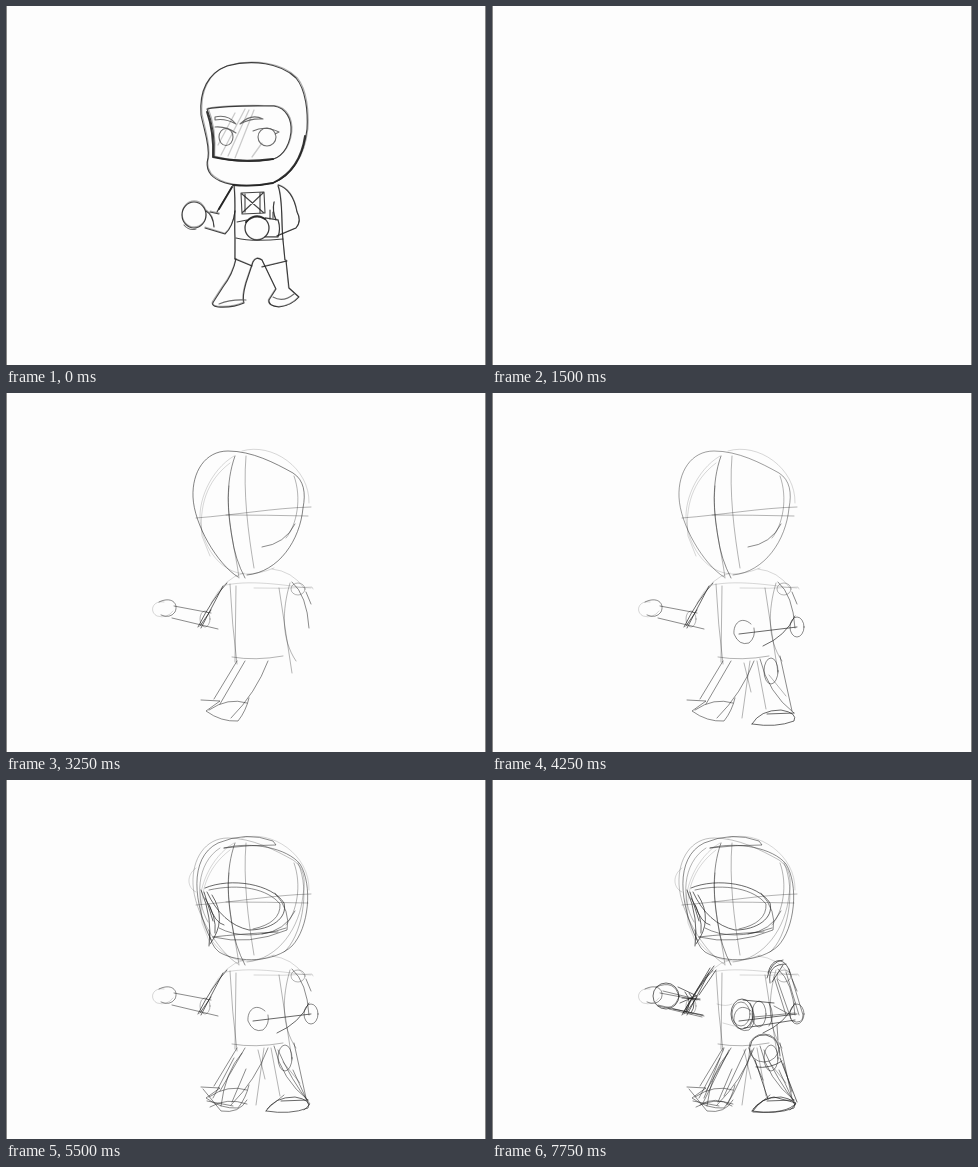
Animation, 480 px wide and 359 px high, one loop 8000 ms. Source, as an HTML page without scripts:

```html
<!DOCTYPE html>
<html lang="en">
<head>
<meta charset="utf-8">
<title>Pencil sketch</title>
<style>
  @property --t { syntax: "<number>"; inherits: true; initial-value: 0; }
  html, body { margin: 0; width: 100%; height: 100%; overflow: hidden; background: #fdfdfd; }
  /* --t counts quarter seconds */
  svg { display: block; width: 100%; height: 100%; animation: clock 8s steps(32) infinite; }
  @keyframes clock { from { --t: 0; } to { --t: 32; } }
  path, ellipse { fill: none; stroke: #222; stroke-width: .8; stroke-linecap: round; stroke-linejoin: round; }
  .step { --off: 99; opacity: min(var(--t) - var(--at) + 1, var(--off) - var(--t)); }
  .inked { opacity: calc((6 - var(--t)) * .55); }
  .skull { opacity: min(var(--t) - 7, max(.42, 1 - (var(--t) - 9) * .045)); }
  .faint { stroke-opacity: .22; }
  .soft { stroke-opacity: .42; }
  .mid { stroke-opacity: .65; }
  .dark { stroke-opacity: .85; }
  .ink path, .ink ellipse { stroke-width: 1.1; stroke-opacity: .85; }
  .ink .heavy { stroke-width: 1.9; stroke-opacity: .9; }
  .ink .face { stroke: #555; }
  .ink .glare { stroke: #aaa; stroke-width: 1.3; stroke-opacity: .6; }
</style>
</head>
<body>
<svg viewBox="0 0 480 359" preserveAspectRatio="none">
  <rect width="480" height="359" fill="#fdfdfd"/>

  <!-- finished figure -->
  <g class="inked ink">
    <g id="outline">
      <path d="M195 109C193 85 202 67 221 60C246 53 275 57 290 72C300 84 302 106 301 123C298 150 286 170 267 177C250 181 228 181 214 175C203 170 199 163 202 152C204 139 198 124 195 109"/>
      <path d="M201 103C224 99 248 100 268 100C280 102 286 113 285 126C283 143 274 153 263 154C244 157 224 155 208 151C209 134 207 117 201 103"/>
      <path d="M228 180C230 198 228 213 229 232V253M272 180C277 193 275 215 277 234L279 254"/>
      <path d="M226 181L211 206M229 205Q227 221 219 228L199 222M200 205Q207 209 208 221M204 206L213 208"/>
      <path d="M272 179C282 182 288 190 291 206Q296 215 290 222L271 230M268 196Q266 205 270 214"/>
      <ellipse cx="188" cy="209" rx="12" ry="13"/>
      <ellipse cx="251" cy="222" rx="12" ry="12"/>
      <path d="M259 212L272 214Q275 223 272 231L259 231"/>
      <path d="M230 253Q227 268 217 281L208 295Q204 300 212 301Q227 302 238 297Q236 291 240 277L247 256Q250 250 256 254L270 283L263 294Q262 300 273 301Q285 300 293 291L283 282L280 254"/>
      <path d="M229 253L246 260M256 261L281 255"/>
    </g>
    <use href="#outline" transform="rotate(.5 245 180) translate(.4 -.6)" opacity=".42"/>
    <path class="heavy" d="M201 106Q208 126 207 151Q233 157 267 153M299 130C296 151 286 168 267 177Q247 181 227 179"/>
    <path class="heavy" d="M226 181L213 203M240 216Q249 207 259 213"/>
    <g id="chest">
      <path d="M235 187L258 186L259 207L236 208ZM236 188L258 207M257 187L236 207"/>
      <path d="M239 188V206M254 187V207M264 204V213M267 206V212M231 216L241 214M230 232Q246 236 277 233"/>
    </g>
    <path class="glare" d="M243 104L222 150M248 104L229 152M239 103L215 149M256 137L246 151M229 107L212 139"/>
    <path class="face" d="M209 111Q222 108 230 118Q219 112 209 114ZM234 118Q245 107 257 113Q245 112 234 118Z"/>
    <path class="face" d="M209 121Q220 120 230 127M247 125Q259 119 273 126L269 128"/>
    <ellipse class="face" cx="220" cy="131" rx="7" ry="8.5"/>
    <ellipse class="face" cx="261" cy="131" rx="9" ry="9"/>
    <path class="face" d="M178 219Q183 225 190 223M213 298Q225 293 240 294M267 291Q277 297 288 288"/>
  </g>

  <!-- head -->
  <g class="skull">
    <path class="dark" d="M232 184C211 171 188 131 187 104C186 79 199 58 222 58C246 58 269 70 287 80C298 87 300 100 297 115C294 147 273 179 241 182"/>
  </g>
  <g class="step" style="--at:8">
    <path class="faint" d="M236 58C266 49 304 75 303 110M228 63C204 77 190 111 195 133C199 156 215 180 240 181Q254 181 268 175M224 70C200 88 193 114 196 143L204 163"/>
    <path class="mid" d="M229 63C219 91 222 119 226 144Q229 166 239 185"/>
    <path class="soft" d="M223 93C219 125 230 158 233 185M240 63C237 99 242 139 248 175"/>
    <path class="soft" d="M190 125C230 122 267 115 305 114M220 122Q260 122 302 123"/>
  </g>
  <g class="step" style="--at:9">
    <path class="soft" d="M288 83C296 105 291 132 280 145"/>
    <path class="mid" d="M289 131Q279 151 256 154"/>
    <path class="faint" d="M248 195Q278 196 306 194L307 196M266 176Q286 178 298 195"/>
  </g>
  <g class="step" style="--at:9;--off:10">
    <path class="soft" d="M298 195C305 209 302 222 298 230"/>
    <path class="dark" d="M300 225Q297 234 290 240"/>
  </g>

  <!-- torso, left arm and left leg -->
  <g class="step" style="--at:10">
    <path class="faint" d="M220 192C249 186 286 194 305 195M238 180Q219 184 205 210"/>
    <path class="soft" d="M224 191Q226 232 231 271M230 193L229 269M273 195L286 280M284 190C276 217 275 246 290 268"/>
    <path class="soft" d="M226 264Q249 268 277 263"/>
  </g>
  <g class="step" style="--at:11">
    <path class="dark" d="M221 190Q206 206 192 234M217 193L195 235M205 217L194 233"/>
    <path class="mid" d="M168 213L205 220M166 225L212 236"/>
    <path class="mid" d="M153 209C165 203 173 210 169 219Q164 226 155 222"/>
    <path class="faint" d="M158 209C146 207 143 219 151 223Q161 226 167 218"/>
    <ellipse class="soft" cx="199" cy="226" rx="5" ry="8"/>
  </g>
  <g class="step" style="--at:12">
    <path class="mid" d="M231 268L208 306M239 268L214 311M262 268Q250 300 225 325"/>
    <path class="mid" d="M195 307L214 308L200 318Q215 329 232 328Q240 318 243 305M203 317Q222 304 241 310"/>
  </g>

  <!-- right arm and right leg -->
  <g class="step" style="--at:13">
    <path class="mid" d="M286 189Q301 202 303 235M300 199L305 211"/>
    <ellipse class="soft" cx="292" cy="196" rx="7" ry="6"/>
  </g>
  <g class="step" style="--at:14">
    <ellipse class="mid" cx="305" cy="234" rx="7" ry="10"/>
    <path class="dark" d="M247 241L305 234M271 253Q294 243 303 223"/>
  </g>
  <g class="step" style="--at:15">
    <path class="mid" d="M259 231C249 222 241 231 242 241Q247 253 257 250Q264 244 262 235"/>
    <path class="soft" d="M252 270L259 299M258 268L250 325"/>
  </g>
  <g class="step" style="--at:16">
    <path class="mid" d="M268 266Q276 300 302 320M288 263L300 318"/>
    <ellipse class="mid" cx="279" cy="278" rx="7" ry="13"/>
  </g>
  <g class="step" style="--at:17">
    <path class="dark" d="M260 331Q268 317 289 317Q306 320 302 328Q284 335 260 331M275 321L302 320"/>
    <path class="soft" d="M277 282L294 303M265 268L274 316"/>
  </g>

  <!-- helmet and visor -->
  <g class="step" style="--at:18">
    <path class="mid" d="M205 160C188 124 182 78 212 63Q240 51 267 61L270 65Q243 65 218 68"/>
    <path class="faint" d="M190 88C180 95 181 108 190 112"/>
  </g>
  <g class="step" style="--at:19">
    <path class="mid" d="M218 68C246 61 281 68 294 84C307 105 303 148 286 166C269 182 233 184 213 172Q204 165 203 150"/>
    <path class="soft" d="M214 68C190 83 189 120 202 142M292 83C305 111 295 158 278 172"/>
  </g>
  <g class="step" style="--at:20">
    <path class="dark" d="M199 108C225 97 266 104 278 123C282 138 265 150 243 150Q216 144 201 112"/>
    <path class="mid" d="M203 110C234 103 262 109 274 124Q275 143 247 149"/>
  </g>
  <g class="step" style="--at:21">
    <path class="mid" d="M207 157Q243 166 281 150Q285 131 269 113M213 148Q239 162 280 148M207 157Q232 154 272 152"/>
    <path class="dark" d="M195 110Q207 138 203 166M199 118Q211 136 209 153M206 115Q222 140 204 164M198 112L207 141M203 125Q209 143 218 145"/>
  </g>
  <g class="step" style="--at:22">
    <path class="mid" d="M204 327Q221 317 241 324M197 309L215 331Q233 334 241 320M236 273Q219 292 215 326M228 278L207 318M240 289L226 322"/>
    <path class="mid" d="M272 270Q285 300 304 324L298 330M261 329L278 315M287 290L303 325M201 321L227 326"/>
  </g>

  <!-- sleeves and right glove -->
  <g class="step" style="--at:23">
    <path class="dark" d="M222 186Q207 205 190 235M218 188L191 233M224 190L207 215"/>
    <path class="mid" d="M171 211L208 220M177 229L210 237"/>
  </g>
  <g class="step" style="--at:24">
    <path class="dark" d="M276 193C280 176 294 177 298 193M275 198Q279 181 291 180M278 203Q275 184 294 184M280 202L291 185"/>
  </g>
  <g class="step" style="--at:25">
    <path class="mid" d="M297 189L311 235Q311 245 300 241M294 192L307 235M282 197L294 235M285 199L299 239"/>
  </g>
  <g class="step" style="--at:26">
    <ellipse class="dark" cx="250" cy="234" rx="11" ry="15"/>
    <ellipse class="mid" cx="249" cy="234" rx="9" ry="12"/>
    <path class="dark" d="M251 220L282 223M252 248L303 240"/>
  </g>
  <g class="step" style="--at:27">
    <ellipse class="mid" cx="267" cy="234" rx="7" ry="13"/>
    <path class="mid" d="M258 223Q266 235 258 246M277 223Q284 236 277 246M262 237L303 233M282 226L295 233M285 245L286 260"/>
    <path class="faint" d="M225 224Q234 227 240 224M231 243L242 246"/>
  </g>

  <!-- left glove and knees -->
  <g class="step" style="--at:28">
    <ellipse class="dark" cx="174" cy="216" rx="13" ry="13"/>
    <path class="mid" d="M164 207Q183 199 187 217Q182 232 166 226"/>
  </g>
  <g class="step" style="--at:29">
    <path class="dark" d="M186 207L205 216M181 229L211 235M193 212Q201 222 194 232M197 213Q206 223 199 233M190 218L208 219M188 223L204 216"/>
  </g>
  <g class="step" style="--at:30">
    <ellipse class="mid" cx="272" cy="268" rx="15" ry="14"/>
    <path class="dark" d="M264 287Q278 289 290 281M258 267Q260 254 274 255Q288 258 288 276"/>
    <path class="mid" d="M232 268L212 318M237 270L211 323M260 270Q249 301 235 325"/>
  </g>
  <g class="step" style="--at:31">
    <path class="dark" d="M263 280L276 319M288 278L305 322M261 331Q270 318 282 317L304 323Q296 334 261 332"/>
    <path class="mid" d="M257 268L271 300M291 283L300 312M208 325Q223 315 240 326M254 269L232 316"/>
  </g>

  <path d="M.5 0V359M479.5 0V359" style="stroke:#888;stroke-width:1"/>
</svg>
</body>
</html>
```
